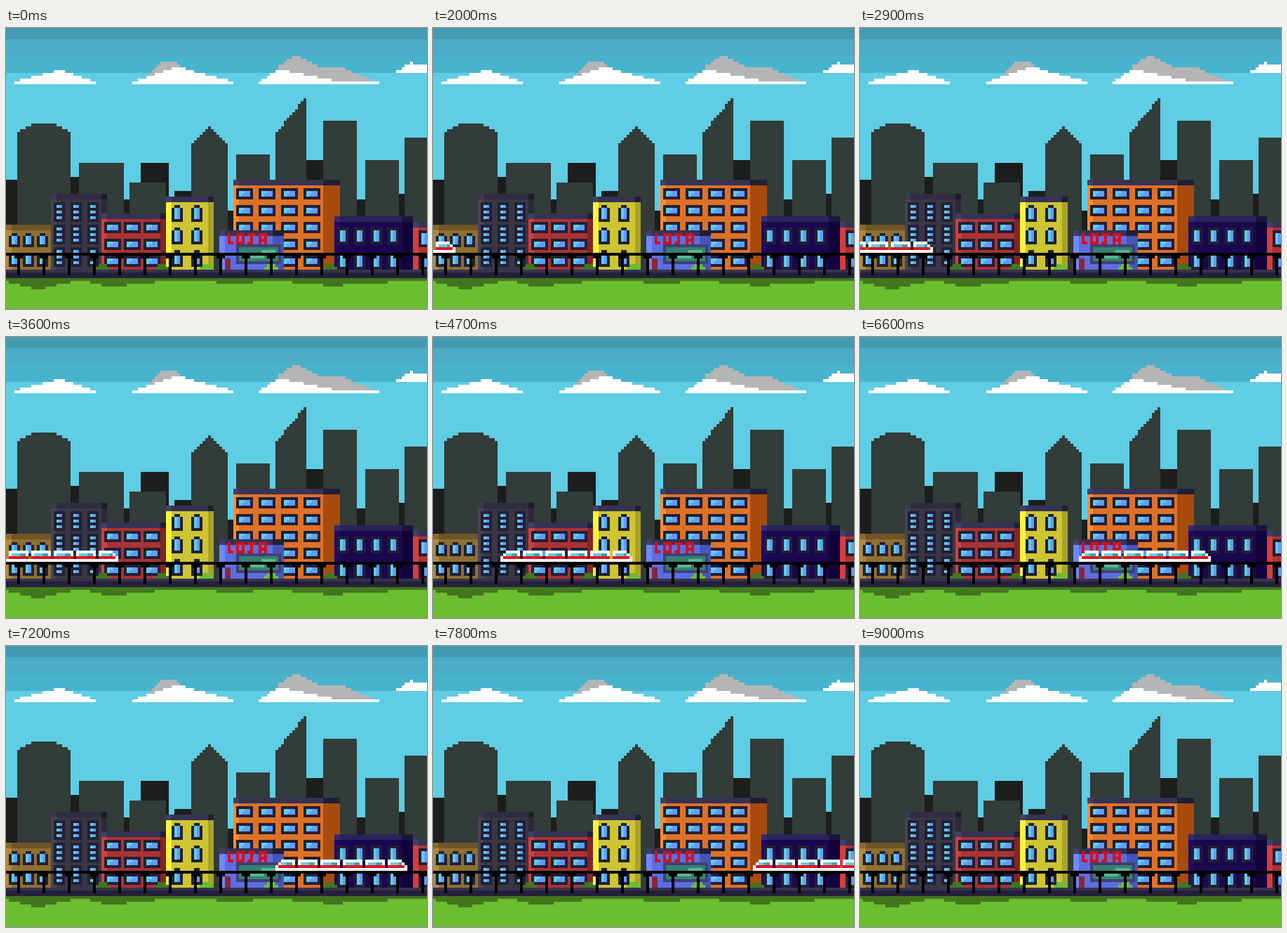
Animation of 600 by 400 pixels, one loop 9200 ms. Source, as an HTML page with a canvas:

```html
<!DOCTYPE html>
<html lang="pt">
<head>
<meta charset="utf-8">
<title>City train</title>
<style>
html, body { margin: 0; width: 100%; height: 100%; overflow: hidden; background: #5fcde4; }
canvas { display: block; width: 600px; height: 400px; image-rendering: pixelated; }
</style>
</head>
<body>
<canvas id="stage" width="600" height="400"></canvas>
<script>
const CELL = 4, LOOP = 9200, START = 1300, STEP = 100;
const ctx = document.getElementById('stage').getContext('2d');
const city = document.createElement('canvas');
const rail = document.createElement('canvas');
for (const c of [city, rail]) { c.width = 600; c.height = 400; }
let g = city.getContext('2d');

const ROOF = '#353353', ROOF_DARK = '#201e38', FRAME = '#222034';
const BLUE = '#639bff', CYAN = '#5fcde4', WHITE = '#ffffff';
const GRASS = '#6abe30', SHADE = '#43751f';

const snap = v => Math.floor(v / CELL) * CELL;

// Box from (x0, y0) to (x1, y1) in stage pixels
function box(color, x0, y0, x1, y1) {
  g.fillStyle = color;
  g.fillRect(x0, y0, x1 - x0, y1 - y0);
}

// Stepped slope: each row below the top grows by dl and dr, kept within min and max
function slope(color, y, n, l, r, dl, dr, min = 0, max = 600) {
  for (let i = 0; i < n; i++) {
    box(color, Math.max(min, snap(l - i * dl)), y + i * CELL,
      Math.min(max, snap(r + i * dr)), y + (i + 1) * CELL);
  }
}

function repeat(x0, dx, nx, y0, dy, ny, draw) {
  for (let j = 0; j < ny; j++) {
    for (let i = 0; i < nx; i++) draw(x0 + i * dx, y0 + j * dy);
  }
}

function sky() {
  box('#5fcde4', 0, 0, 600, 400);
  box('#48b3cd', 0, 0, 600, 64);
  box('#4dadc6', 0, 0, 600, 40);
  box('#429bb0', 0, 0, 600, 16);
}

function clouds() {
  const gray = '#b5b5b5';
  slope(WHITE, 60, 5, 68, 84, 16, 12, 12, 128);
  slope(gray, 48, 5, 220, 244, 4, 4);
  slope(WHITE, 56, 6, 236, 256, 12, 15, 180, 324);
  slope(gray, 40, 5, 408, 420, 6, 8, 388);
  slope(gray, 56, 5, 392, 484, 4, 9.5);
  slope(WHITE, 60, 4, 384, 404, 6, 20);
  box(WHITE, 360, 76, 532, 80);
  slope(WHITE, 48, 4, 576, 580, 6, 20);
}

function skyline() {
  const far = '#1b1e1d', mid = '#323c39';
  const tower = (color, l, r, y) => box(color, l, y, r, 344);
  tower(far, 0, 16, 216);
  tower(far, 92, 104, 212);
  tower(far, 192, 232, 192);
  tower(far, 168, 328, 244);
  tower(far, 240, 264, 232);
  tower(far, 428, 452, 188);
  tower(far, 500, 560, 244);
  tower(far, 560, 568, 236);
  box('#5fcde4', 316, 244, 328, 260);

  tower(mid, 16, 92, 148);
  slope(mid, 136, 3, 36, 72, 8, 8);
  tower(mid, 104, 168, 192);
  tower(mid, 176, 228, 220);
  tower(mid, 264, 316, 164);
  slope(mid, 140, 6, 288, 292, 4, 4);
  tower(mid, 328, 376, 180);
  tower(mid, 384, 428, 148);
  slope(mid, 100, 12, 426, 428, 10 / 3, 0);
  tower(mid, 452, 500, 132);
  tower(mid, 512, 560, 188);
  tower(mid, 568, 600, 156);
}

// Front wall with a lit left edge, a shaded side from x = edge, and a two-cell roof
function house(l, edge, r, top, wall, side, roof = ROOF, roofSide = ROOF_DARK) {
  box(wall, l, top, edge, 344);
  box(side, edge, top, r, 344);
  box(roof, l, top, edge, top + 8);
  box(roofSide, edge, top, r, top + 8);
  g.globalCompositeOperation = 'color-dodge';
  box('#303030', l, top, l + 8, 344);
  g.globalCompositeOperation = 'source-over';
}

function wideWindow(x, y) {
  box(FRAME, x, y, x + 24, y + 16);
  box(BLUE, x + 4, y + 4, x + 20, y + 12);
  slope(CYAN, y + 4, 2, x + 4, x + 12, 0, -4);
}

function tallWindow(x, y, h, arch) {
  box(FRAME, x, y + 4, x + 16, y + h);
  box(FRAME, x + (arch ? 4 : 0), y, x + (arch ? 12 : 16), y + 4);
  box(BLUE, x + 4, y + 4, x + 12, y + h - 4);
  box(CYAN, x + 4, y + 4, x + 8, y + h - 4);
}

function slats(x, y) {
  box(FRAME, x, y, x + 16, y + 28);
  for (let k = y + 4; k < y + 28; k += 8) {
    box(BLUE, x + 4, k, x + 12, k + 4);
    box(CYAN, x + 4, k, x + 8, k + 4);
  }
}

function sign(x, y) {
  const bar = (i, j, w, h) =>
    box('#d50f1c', x + i * CELL, y + j * CELL, x + (i + w) * CELL, y + (j + h) * CELL);
  // L
  bar(0, 0, 1, 4); bar(1, 3, 1, 1);
  // O
  bar(3, 0, 1, 4); bar(5, 0, 1, 4); bar(4, 0, 1, 1); bar(4, 3, 1, 1);
  // J
  bar(7, 0, 3, 1); bar(8, 1, 1, 3); bar(7, 3, 1, 1);
  // A
  bar(11, 0, 1, 4); bar(13, 0, 1, 4); bar(12, 0, 1, 1); bar(12, 2, 1, 1);
}

function shop() {
  house(304, 380, 396, 288, '#5b6ee1', '#4656b8');
  box('#3f3f74', 328, 308, 392, 336);
  box('#37806f', 332, 312, 388, 332);
  slope('#56b98f', 316, 3, 364, 384, 12, -8);
  box('#8b2635', 312, 328, 320, 344);
  sign(316, 292);
}

function houses() {
  house(0, 64, 64, 280, '#8f7030', '#8f7030', '#705526');
  repeat(4, 20, 3, 292, 28, 2, (x, y) => tallWindow(x, y, 20, y < 300));

  house(64, 136, 144, 236, '#393744', '#2c2a38', '#302d40', '#1d1c26');
  repeat(68, 24, 3, 248, 32, 3, slats);

  house(136, 220, 228, 264, '#ac3232', '#852328');
  repeat(140, 28, 3, 276, 24, 3, wideWindow);

  house(228, 288, 296, 240, '#cdc532', '#aaa329');
  repeat(236, 28, 2, 252, 32, 3, (x, y) => tallWindow(x, y, 24, true));

  house(324, 452, 476, 216, '#df7126', '#a84b0c');
  repeat(328, 32, 4, 228, 24, 5, wideWindow);

  shop();

  house(468, 564, 580, 268, '#1b0750', '#12043a', '#29235a', '#1b153f');
  repeat(472, 24, 4, 284, 36, 2, (x, y) => tallWindow(x, y, 24, false));

  house(580, 600, 600, 276, '#ac3232', '#ac3232');
  repeat(588, 24, 1, 288, 32, 2, (x, y) => tallWindow(x, y, 24, false));
}

function bush(x, color) {
  slope(color, 336, 2, x + 4, x + 16, 4, 4);
}

function ground() {
  bush(128, SHADE);
  bush(212, SHADE);
  bush(276, GRASS);
  bush(368, GRASS);
  bush(452, SHADE);
  box('#37324f', 0, 344, 600, 348);
  box('#25213a', 0, 348, 600, 356);
  box(GRASS, 0, 356, 600, 400);
  box(SHADE, 0, 356, 600, 360);
  slope(SHADE, 360, 3, 4, 92, -16, -18);
  slope(SHADE, 360, 2, 120, 212, -16, -40);
  slope(SHADE, 360, 1, 300, 352, 0, 0);
  slope(SHADE, 360, 2, 408, 544, -44, -64);
}

function viaduct() {
  box('#000000', 0, 320, 600, 324);
  for (let x = 16; x < 600; x += 36) {
    box('#000000', x - 4, 324, x + 8, 328);
    box('#000000', x, 328, x + 4, 352);
  }
}

// Key points of the run: [step, nose position in cells]
const RUN = [[0, 0], [8, 8], [26, 44], [36, 74], [54, 125], [78, 197]];

function nosePos(t) {
  const n = Math.min(78, Math.floor((t - START) / STEP) + 1);
  const k = RUN.findIndex(p => p[0] >= n);
  const [n0, p0] = RUN[k - 1], [n1, p1] = RUN[k];
  return Math.round(p0 + (p1 - p0) * (n - n0) / (n1 - n0));
}

// Six cars; the end cars taper towards nose and tail
function train(nose) {
  const y = 304;
  for (let i = 0; i < 6; i++) {
    const r = nose * CELL - i * 32, l = r - 28;
    const tip = i === 0 ? 4 : 0, tail = i === 5 ? 4 : 0;
    slope(WHITE, y, 2, l + 2 * tail, r - 2 * tip, tail, tip, -60, 800);
    box(WHITE, l, y + 8, r, y + 16);
    box('#37a3ad', l + 4 + tail, y + 4, r - 4 - tip, y + 8);
    box(CYAN, l + 4 + tail, y + 4, l + 16, y + 8);
    box('#e8131c', l + tail, y + 8, r - tip, y + 12);
    if (!tail) box(WHITE, l - 4, y + 12, l, y + 16);
  }
}

sky();
clouds();
skyline();
houses();
ground();
g = rail.getContext('2d');
viaduct();
g = ctx;

let begin = null;
function frame(now) {
  if (begin === null) begin = now;
  const t = (now - begin) % LOOP;
  ctx.drawImage(city, 0, 0);
  if (t >= START) train(nosePos(t));
  ctx.drawImage(rail, 0, 0);
  requestAnimationFrame(frame);
}
requestAnimationFrame(frame);
</script>
</body>
</html>
```
